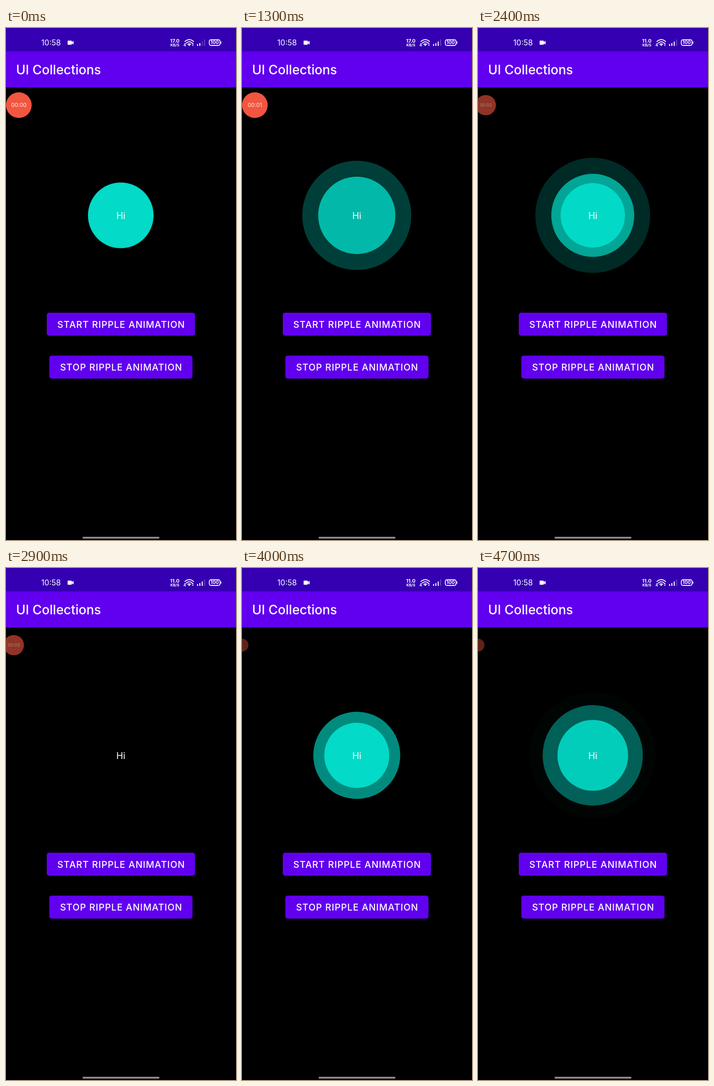
Write an HTML page that moves like this. It is 502x1115 px and loops after 4800 ms.

```html
<!DOCTYPE html>
<html lang="en">
<head>
<meta charset="utf-8">
<title>Ripple</title>
<style>
  html, body { margin: 0; width: 100%; height: 100%; overflow: hidden; background: #000; }
  svg { display: block; width: 502px; height: 1115px; }
  text { font-family: Inter, Roboto, sans-serif; fill: #fff; }
  .mid { text-anchor: middle; }
  .button rect { fill: #6100ef; }
  .button text { font-size: 20px; font-weight: 500; letter-spacing: 1px; text-anchor: middle; }
  .bold { font-weight: 700; }
</style>
</head>
<body>
<svg viewBox="0 0 502 1115">
  <rect width="502" height="1115"/>
  <rect width="502" height="52" fill="#3500b1"/>
  <rect y="51" width="502" height="78.5" fill="#6000ee"/>

  <!-- status bar -->
  <text x="77" y="38" font-size="16.8">10:58</text>
  <path d="M135.5 27.5h7q1 0 1 1v2l4-2.6v8.2l-4-2.6v2q0 1-1 1h-7q-1 0-1-1v-7q0-1 1-1z" fill="#fff"/>
  <text id="speed" class="bold mid" x="368.5" y="31.5" font-size="11"></text>
  <text class="bold mid" x="368.5" y="40" font-size="8">KB/S</text>
  <g fill="none" stroke="#fff" stroke-width="1.8" stroke-linecap="round">
    <path d="M390.5 29.5q9.5-8.500 19 0M393.500 32.700q6.500-5.600 13 0M396.800 35.500q3.200-2.600 6.400 0"/>
    <rect x="443.700" y="25.500" width="23.500" height="12.500" rx="4"/>
    <path d="M469.300 30v3.500" stroke-width="1.500"/>
  </g>
  <circle cx="400" cy="37.300" r="1.700" fill="#fff"/>
  <path d="M405.800 35l2-2.800 2 2.800zM405.800 36.500l2 2.800 2-2.800z" fill="#fff"/>
  <text class="bold mid" x="390.200" y="39.500" font-size="8.500">4</text>
  <g id="bars" fill="#fff">
    <rect x="417" y="35" width="2.200" height="4"/>
    <rect x="422" y="33" width="2.200" height="6"/>
    <rect x="427.200" y="29.500" width="2.200" height="9.500"/>
    <rect x="432.300" y="25" width="2.200" height="14" opacity=".25"/>
  </g>
  <text class="bold mid" x="455.500" y="35.400" font-size="10">100</text>

  <text x="22" y="101" font-size="28" font-weight="500">UI Collections</text>

  <g id="timer">
    <circle r="28" fill="#f25540"/>
    <text id="clock" class="mid" y="4.400" font-size="12" opacity=".9"></text>
  </g>

  <g id="ripples" fill="#03dac7">
    <circle cx="250.500" cy="408"/>
    <circle cx="250.500" cy="408"/>
    <circle cx="250.500" cy="408"/>
  </g>
  <text class="mid" x="250.500" y="415.500" font-size="20">Hi</text>

  <g class="button">
    <rect x="89" y="620" width="323.500" height="50" rx="5"/>
    <text x="251.500" y="652.700">START RIPPLE ANIMATION</text>
    <rect x="94.500" y="713.500" width="312.500" height="50" rx="5"/>
    <text x="251.500" y="746">STOP RIPPLE ANIMATION</text>
  </g>
  <rect x="167" y="1108" width="168" height="4" rx="2" fill="#8a8a8a"/>
</svg>
<script>
const LOOP = 4800, STEP = 100;
const FIRST_START = -146, STOP = 2850, SECOND_START = 3390;
const LIFE = 1500, GAP = 500, RADIUS = 70;

const el = id => document.getElementById(id);
const ramp = (t, from, to) => Math.min(1, Math.max(0, (t - from) / (to - from)));
const mix = (a, b, k) => a + (b - a) * k;

function drawRipples(t) {
  const running = t < STOP || t >= SECOND_START;
  const start = t < STOP ? FIRST_START : SECOND_START;
  el('ripples').style.display = running ? '' : 'none';
  if (!running) return;
  [...el('ripples').children].forEach((ring, i) => {
    // a ring waits at its smallest size until its turn comes
    const age = Math.max(0, t - start - i * GAP) % LIFE / LIFE;
    const eased = (1 - Math.cos(Math.PI * age)) / 2;
    ring.setAttribute('r', RADIUS * (1 + eased));
    ring.setAttribute('opacity', Math.max(0, 1 - 1.02 * eased));
  });
}

function drawTimer(t) {
  const shrink = ramp(t, 1450, 1650), tuck = ramp(t, 3550, 3750);
  const x = mix(mix(28, 17, shrink), 0, tuck);
  const scale = mix(mix(1, 0.79, shrink), 0.5, tuck);
  el('timer').setAttribute('transform', `translate(${x} 168) scale(${scale})`);
  el('timer').setAttribute('opacity', mix(mix(1, 0.6, shrink), 0.4, tuck));
  el('clock').textContent = '00:0' + Math.floor((t + 450) / 1000);
  el('clock').style.display = tuck > 0 ? 'none' : '';
}

function draw() {
  const t = Math.floor(performance.now() % LOOP / STEP) * STEP;
  drawRipples(t);
  drawTimer(t);
  el('speed').textContent = t < 1500 ? '17.0' : '11.0';
  el('bars').children[2].setAttribute('opacity', t < 400 ? 0.25 : 1);
  requestAnimationFrame(draw);
}
draw();
</script>
</body>
</html>
```
